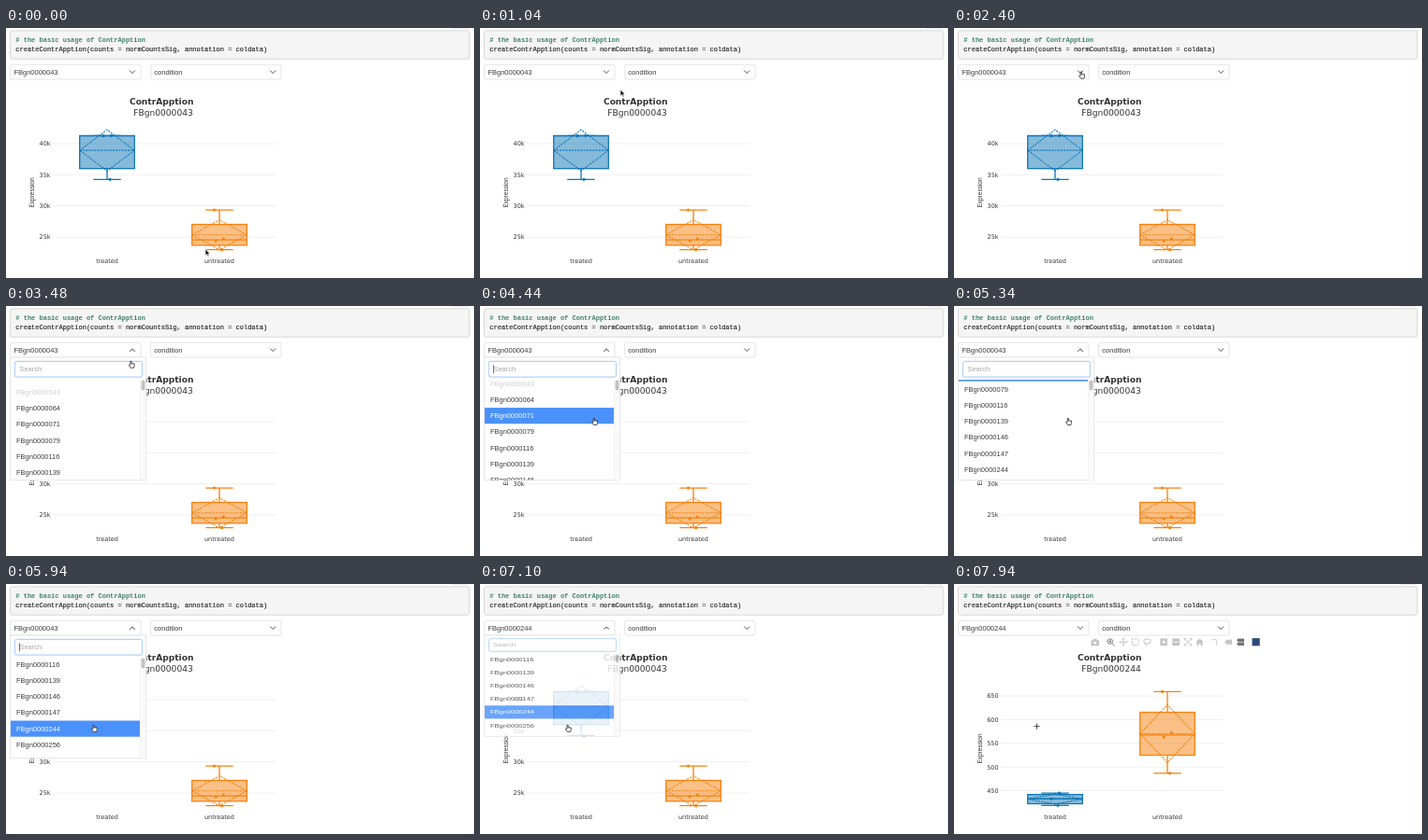
Write an HTML page that moves like this. It is 500 px wide and 268 px high and loops after 8000 ms.

```html
<!DOCTYPE html>
<html lang="en">
<head>
<meta charset="utf-8">
<title>Gene expression box plots</title>
<style>
  html, body { margin: 0; width: 100%; height: 100%; overflow: hidden; background: #fff; }
  svg { display: block; width: 500px; height: 268px; }
  text { white-space: pre; }
  .code { font: 7px "Liberation Mono", "Courier New", monospace; fill: #222; stroke: #222; stroke-width: .15; }
  .code.comment { font-weight: bold; fill: #43806c; stroke: none; }
  .ui { font: 7.5px "Liberation Sans", Arial, sans-serif; fill: #3c3c3c; }
  .plot { font: 6.5px "DejaVu Sans", Verdana, sans-serif; fill: #333; }
  .title { font-size: 9.1px; text-anchor: middle; }
  .mid { text-anchor: middle; }
  .end { text-anchor: end; }
  .axis-title { font-family: "Liberation Sans", Arial, sans-serif; }
  .field { fill: #fff; stroke: #dcdee2; stroke-width: .8; }
  .chevron { fill: none; stroke: #555; stroke-linecap: round; }
  .grid { stroke: #ebebeb; stroke-width: .8; }
  .tools { color: #c4c4c4; fill: none; stroke: currentColor; }
  .tools .active { color: #777; }
  .tools .solid { fill: currentColor; stroke: none; }
  .hint { fill: #a6a6a6; }
</style>
</head>
<body>
<svg viewBox="0 0 500 268" xmlns="http://www.w3.org/2000/svg">
  <path d="M476 .2H494" stroke="#d4d4d4" stroke-width=".6"/>
  <rect x="4.5" y="2.8" width="490.5" height="30.4" rx="2" fill="#f5f5f5" stroke="#cfcfcf" stroke-width=".8"/>
  <text class="code comment" x="10.3" y="15.2"># the basic usage of ContrApption</text>
  <text class="code" x="10.3" y="25.2">createContrApption(counts = normCountsSig, annotation = coldata)</text>

  <g class="plot">
    <text class="title" x="166.2" y="82" font-weight="bold">ContrApption</text>
    <text class="title" id="gene" x="168" y="94.3"></text>
    <text class="mid" x="108" y="251.5">treated</text>
    <text class="mid" x="228" y="251.5">untreated</text>
    <text class="mid axis-title" transform="translate(29.8 176.5) rotate(-90)">Expression</text>
  </g>
  <g id="before"></g>
  <g id="after"></g>
  <g id="tools" class="tools"></g>

  <rect class="field" x="4.7" y="39.2" width="139.3" height="15.8" rx="2"/>
  <rect class="field" x="154.7" y="39.2" width="139.3" height="15.8" rx="2"/>
  <text class="ui" id="chosen" x="8.4" y="49.8"></text>
  <text class="ui" x="158.3" y="49.8">condition</text>
  <path class="chevron" id="arrow"/>
  <path class="chevron" d="M282.5 45.8l2.6 2.8 2.6-2.8"/>

  <clipPath id="listClip"><rect x="4.5" y="79" width="145" height="107.4"/></clipPath>
  <g id="menu" class="ui">
    <rect class="field" x="4.7" y="55" width="145" height="131.8"/>
    <rect x="9.6" y="59.4" width="135.8" height="16.6" rx="2" fill="none" stroke="#e3effd" stroke-width="2"/>
    <rect x="9.6" y="59.4" width="135.8" height="16.6" rx="2" fill="#fff" stroke="#9cc6f7" stroke-width=".8"/>
    <text class="hint" x="14.4" y="70.2">Search</text>
    <path id="caret" d="M14.5 63.3v9" stroke="#555" stroke-width=".8"/>
    <g clip-path="url(#listClip)">
      <g id="list"><rect id="mark" x="5" width="138" height="17.2" fill="#4b91fc"/></g>
      <rect x="143.4" y="79" width="6" height="108" fill="#fafafa"/>
      <path d="M143.4 79v108" stroke="#e8e8e8" stroke-width=".6"/>
      <rect x="144.6" y="79.5" width="3.8" height="11" rx="1.9" fill="#c1c1c1"/>
    </g>
  </g>

  <g id="pointer" stroke-linejoin="round">
    <path id="arrowCursor" d="M0 0v6.8l1.6-1.4 1.1 2.5 1.2-.5-1.1-2.4h2.1z" fill="#111" stroke="#fff" stroke-width=".6"/>
    <path id="handCursor" d="M-.6 0h1.2v2.6h3v2.6l-.6 1.9h-3.2l-2-2.7.6-.9 1 .6z" fill="#fff" stroke="#222" stroke-width=".8"/>
    <path id="crossCursor" d="M-3 0h6M0-3v6" stroke="#222" stroke-width=".8"/>
  </g>
</svg>
<script>
const $ = id => document.getElementById(id);
const LOOP = 8000, ROW = 17.2, LIST_TOP = 83.7;
const genes = [43, 64, 71, 79, 116, 139, 146, 147, 244, 256]
  .map(n => 'FBgn' + String(n).padStart(7, '0'));

// Each sample keeps its sideways jitter for every gene.
const groups = [
  { cx: 108, color: '#0f76b6', jitter: [-4, 4.6, 3] },
  { cx: 228, color: '#f5820f', jitter: [-5.5, -3.9, 4.3, 2.6] }
];

function quantile(sorted, p) {
  const at = p * sorted.length - .5, i = Math.floor(at);
  const next = sorted[Math.min(i + 1, sorted.length - 1)];
  return sorted[i] + (next - sorted[i]) * (at - i);
}

// Box with whiskers, dashed mean and one-deviation diamond.
function box({ cx, color, jitter }, values, toY) {
  const sorted = [...values].sort((a, b) => a - b);
  const avg = list => list.reduce((a, b) => a + b) / list.length;
  const m = avg(values), sd = Math.sqrt(avg(values.map(v => (v - m) ** 2)));
  const [q1, median, q3] = [.25, .5, .75].map(p => toY(quantile(sorted, p)));
  const [low, high] = [sorted[0], sorted.at(-1)].map(toY);
  const l = cx - 29.3, r = cx + 29.3, mean = toY(m);
  const cap = y => `M${cx - 14.7} ${y}h29.4`;
  return `<g stroke="${color}" fill="none" stroke-width="1.3">
    <rect x="${l}" y="${q3}" width="58.6" height="${q1 - q3}" fill="${color}" fill-opacity=".5"/>
    <path d="M${l} ${median}H${r}M${cx} ${q3}V${high}M${cx} ${q1}V${low}${cap(high)}${cap(low)}"/>
    <path d="M${l} ${mean}H${r}M${l} ${mean}L${cx} ${toY(m + sd)}L${r} ${mean}L${cx} ${toY(m - sd)}Z" stroke-dasharray="2 1.2" stroke-width="1.1"/>
    ${values.map((v, i) => `<circle cx="${cx + jitter[i]}" cy="${toY(v)}" r="1.6" fill="${color}" stroke="none"/>`).join('')}
  </g>`;
}

// Ticks run down from the highest; gap is their distance in pixels.
function chart({ max, step, count, top, gap, unit, samples }) {
  const toY = v => top + (max - v) / step * gap;
  const axis = Array.from({ length: count }, (_, i) => {
    const v = max - i * step, y = toY(v);
    return `<path class="grid" d="M50 ${y}H288"/><text class="plot end" x="47.6" y="${y + 2.4}">${v}${unit}</text>`;
  });
  return axis.join('') + groups.map((g, i) => box(g, samples[i], toY)).join('');
}

$('before').innerHTML = chart({
  max: 40, step: 5, count: 4, top: 124, gap: 33.35, unit: 'k',
  samples: [[41.25, 41.3, 34.25], [29.35, 24.4, 24.7, 22.95]]
});
$('after').innerHTML = chart({
  max: 650, step: 50, count: 5, top: 120, gap: 25.4, unit: '',
  samples: [[433, 445, 419], [659, 563, 572, 487]]
});

// Toolbar icons, each drawn around its own centre.
const spin = d => [0, 90, 180, 270].map(a => `<path d="${d}" transform="rotate(${a})"/>`).join('');
const tile = sign => `<path class="solid" d="M-3.8-3.8h7.6v7.6h-7.6z"/><path d="${sign}" stroke="#fff"/>`;
const plate = y => `<path class="solid" d="M-4 ${y}l1.5-1.8h6.5v3.5h-6.5z"/>`;
const icons = [
  [150.7, '<path class="solid" d="M-4.2-2h8.4v6h-8.4zM-2-3.5h4V0h-4z"/><circle r="1.6" cy=".8" fill="#fff" stroke="none"/>'],
  [167.5, '<g class="active"><circle cx="-.7" cy="-.7" r="2.7"/><path d="M1.3 1.3L4 4M-2-.7H.6M-.7-2V.6"/></g>'],
  [181, spin('M0 0V-4M-1.2-2.8L0-4l1.2 1.2')],
  [193.6, '<path d="M-3.3-3.3h6.6v6.6h-6.6z" stroke-dasharray="1.6 .9"/>'],
  [206.5, '<ellipse cy="-.7" rx="3.8" ry="2.6"/><path d="M-2 1q-1 2 1.5 3"/>'],
  [224.1, tile('M-2 0h4M0-2v4')],
  [237.1, tile('M-2 0h4')],
  [250, spin('M0 0l3-3M1.8-3.8h2v2')],
  [262.5, '<path class="solid" d="M-4.2 0L0-3.8 4.2 0H3v3.8H1V1.5h-2v2.3h-2V0z"/>'],
  [279, '<path d="M-3.5-2.5h5v6" stroke-dasharray="2 .9"/>'],
  [293, '<path class="solid" d="M-4 0l2.5-2.5H4v5h-5.5z"/>'],
  [306, `<g class="active">${plate(-2)}${plate(2.2)}</g>`],
  [322.6, '<path d="M-4.1-4.1h8.2v8.2h-8.2z" fill="#2f4a78" stroke="none"/>']
];
$('tools').innerHTML = icons.map(([x, art]) => `<g transform="translate(${x} 62.2)">${art}</g>`).join('');

$('list').insertAdjacentHTML('beforeend', genes.map((name, i) =>
  `<text x="10.9" y="${LIST_TOP + ROW * i + 11.2}">${name}</text>`).join(''));
const rows = [...$('list').querySelectorAll('text')];

const smooth = p => p * p * (3 - 2 * p);
const progress = (t, from, to) => Math.min(1, Math.max(0, (t - from) / (to - from)));
const mix = (a, b, p) => a + (b - a) * p;

// Pointer trips: start time, end time, destination.
const moves = [
  [20, 780, 150, 66], [1040, 1420, 135.8, 47], [3300, 4000, 121.8, 120.4],
  [5860, 5940, 93.6, 151.3], [7300, 7800, 88.5, 152.6]
];
function pointerAt(t) {
  let x = 213, y = 237;
  for (const [from, to, toX, toY] of moves) {
    const p = smooth(progress(t, from, to));
    x = mix(x, toX, p);
    y = mix(y, toY, p);
  }
  return [x, y];
}

// The wheel starts and ends a little slower than it runs.
const scrollAt = t => 9 * progress(t, 4220, 4440)
  + 45.6 * progress(t, 4440, 5340) + 20.2 * progress(t, 5340, 5840);

const caretOn = [[2800, 3480], [3980, 4980], [5480, 6380]];
const show = (id, on) => { $(id).style.display = on ? '' : 'none'; };

function draw(t) {
  const [x, y] = pointerAt(t);
  const top = scrollAt(t);
  const open = smooth(progress(t, 2790, 2980)) - smooth(progress(t, 7050, 7240));
  const picked = t >= 7060, redrawn = t >= 7180;

  $('chosen').textContent = genes[picked ? 8 : 0];
  $('gene').textContent = genes[redrawn ? 8 : 0];
  show('before', !redrawn);
  show('after', redrawn);
  $('tools').style.opacity = progress(t, 7580, 7940);

  const bend = 1.4 * (1 - 2 * open);
  $('arrow').setAttribute('d', `M132.4 ${47.2 - bend}L135 ${47.2 + bend}L137.6 ${47.2 - bend}`);

  show('menu', open > 0);
  $('menu').style.opacity = open;
  $('menu').setAttribute('transform', `translate(0 ${55 * (1 - open)}) scale(1 ${open})`);
  $('list').setAttribute('transform', `translate(0 ${-top})`);
  show('caret', caretOn.some(([a, b]) => t >= a && t < b));

  // Hover only follows the pointer, so it stays with its row while scrolling.
  const scrolling = t >= 4220 && t < 5860;
  const hover = scrolling ? 2 : y < 79 ? -1 : Math.floor((y - LIST_TOP + top) / ROW);
  show('mark', hover > 0);
  $('mark').setAttribute('y', LIST_TOP + ROW * hover);
  rows.forEach((row, i) => {
    row.style.fill = i === 0 ? '#cfcfcf' : i === hover ? '#fff' : '';
  });

  $('pointer').setAttribute('transform', `translate(${x} ${y})`);
  show('arrowCursor', t < 1580);
  show('handCursor', t >= 1580 && t < 7240);
  show('crossCursor', t >= 7240);
}

const start = performance.now();
function tick() {
  draw((performance.now() - start) % LOOP);
  requestAnimationFrame(tick);
}
tick();
</script>
</body>
</html>
```
